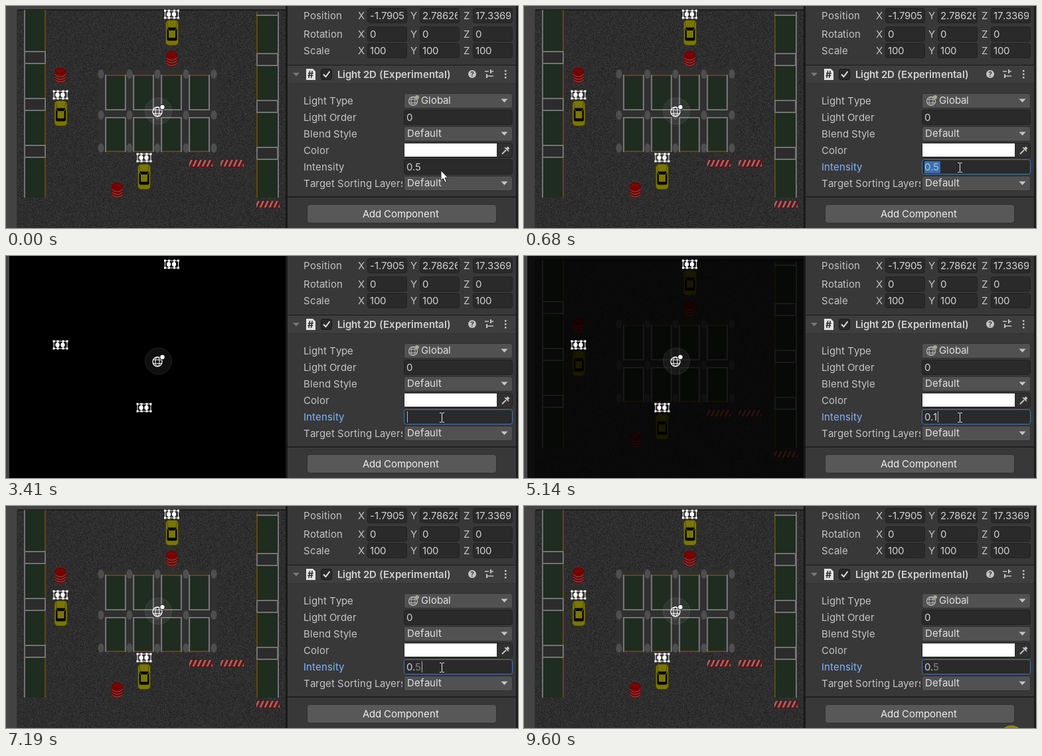
Recreate the animation shown at these times as an HTML page with a canvas. Size 771x336 px, loop 9930 ms.

```html
<!DOCTYPE html>
<html lang="en">
<head>
<meta charset="utf-8">
<title>Light intensity</title>
<style>
html, body { margin: 0; width: 100%; height: 100%; overflow: hidden; background: #383838; }
canvas { display: block; }
</style>
</head>
<body>
<canvas id="stage" width="771" height="336"></canvas>
<script>
const W = 771, H = 336, LOOP = 9930;
const ctx = document.getElementById('stage').getContext('2d');
const FONT = 'Inter, "Open Sans", sans-serif';

// Each step starts at `at` and overrides the state before it.
const STEPS = [
  { at: 0, light: 0.5, text: '0.5', pointer: [655, 249] },
  { at: 330, pointer: null, beam: true, border: '#656565' },
  { at: 680, focus: true, selected: true, border: '#3a79bb' },
  { at: 2040, light: 1, text: '1', selected: false, caret: true },
  { at: 3410, light: 0, text: '' },
  { at: 4440, text: '0' },
  { at: 4790, text: '0.' },
  { at: 5140, light: 0.1, text: '0.1' },
  { at: 6160, light: 0, text: '0.' },
  { at: 7190, light: 0.5, text: '0.', pending: '5' },
  { at: 8570, beam: false, pointer: [694, 316] },
  { at: 8920, pointer: null },
  { at: 9600, caret: false, ripple: true }
];
const stateAt = t => Object.assign({}, ...STEPS.filter(s => s.at <= t));

function rect(c, x, y, w, h, color) {
  c.fillStyle = color;
  c.fillRect(x, y, w, h);
}

function ellipse(c, x, y, rx, ry, fill, stroke, width = 1) {
  c.beginPath();
  c.ellipse(x, y, rx, ry, 0, 0, Math.PI * 2);
  if (fill) { c.fillStyle = fill; c.fill(); }
  if (stroke) { c.strokeStyle = stroke; c.lineWidth = width; c.stroke(); }
}

function roundBox(c, x, y, w, h, r, fill, stroke) {
  c.beginPath();
  c.roundRect(x + 0.5, y + 0.5, w - 1, h - 1, r);
  c.fillStyle = fill;
  c.fill();
  if (stroke) { c.strokeStyle = stroke; c.lineWidth = 1; c.stroke(); }
}

function shape(c, points, fill, stroke) {
  c.beginPath();
  points.forEach(([x, y]) => c.lineTo(x, y));
  c.closePath();
  if (fill) { c.fillStyle = fill; c.fill(); }
  if (stroke) { c.strokeStyle = stroke; c.lineWidth = 1; c.stroke(); }
}

function line(c, color, width, ...points) {
  c.beginPath();
  points.forEach(([x, y], i) => i ? c.lineTo(x, y) : c.moveTo(x, y));
  c.strokeStyle = color;
  c.lineWidth = width;
  c.stroke();
}

// Glyphs advance by whole pixels without kerning; returns the end of the text.
function label(c, text, x, y, color = '#c4c4c4', weight = 400, size = 15) {
  c.font = `${weight} ${size}px ${FONT}`;
  c.fillStyle = color;
  for (const glyph of text) {
    c.fillText(glyph, x, y + 5);
    x += Math.round(c.measureText(glyph).width);
  }
  return x;
}

function clipped(c, x, y, w, h, draw) {
  c.save();
  c.beginPath();
  c.rect(x, y, w, h);
  c.clip();
  draw();
  c.restore();
}

function layer(draw) {
  const canvas = document.createElement('canvas');
  canvas.width = W;
  canvas.height = H;
  draw(canvas.getContext('2d'));
  return canvas;
}

// Scene at full brightness

function asphalt(c) {
  let seed = 7;
  const random = () => (seed = (seed * 16807) % 2147483647) / 2147483647;
  const image = c.createImageData(416, H);
  for (let i = 0; i < image.data.length; i += 4) {
    image.data.fill(92 + (random() + random() - 1) * 36, i, i + 3);
    image.data[i + 3] = 255;
  }
  c.putImageData(image, 5, 0);
}

const GREEN = '#3f5840', WHITE = '#e6e6e6', GOLD = '#b8921c', PAVING = '#616161';

function sideColumn(c, x, top, shift, yellowX, whiteX) {
  rect(c, x, top, 34, 290 - top, PAVING);
  rect(c, x + 2, top, 30, 290 - top, GREEN);
  rect(c, yellowX, top, 2, 290 - top, GOLD);
  rect(c, whiteX, top, 2, 290 - top, WHITE);
  [68, 139, 210].forEach(y => {
    rect(c, x, y + shift, 33, 20, '#585858');
    c.strokeStyle = WHITE;
    c.lineWidth = 2;
    c.strokeRect(x + 1, y + shift + 1, 31, 18);
  });
}

function bay(c, x, y, h, goldAtTop) {
  rect(c, x, y, 32, h, '#696969');
  rect(c, x + 3, y + 2, 26, h - 4, GREEN);
  rect(c, x, y, 2, h, WHITE);
  rect(c, x + 30, y, 2, h, WHITE);
  rect(c, x + 2, y, 28, 2, goldAtTop ? GOLD : WHITE);
  rect(c, x + 2, y + h - 2, 28, 2, goldAtTop ? WHITE : GOLD);
}

function island(c) {
  rect(c, 139, 97, 179, 125, PAVING);
  [149, 191, 233, 275].forEach(x => {
    bay(c, x, 104, 54, true);
    bay(c, x, 168, 53, false);
  });
  [143, 186, 228, 271, 313].forEach(x =>
    [103, 165, 215].forEach(y => ellipse(c, x, y, 4.5, 7, '#9c9c9c')));
}

function car(c, x, y) {
  roundBox(c, x - 10, y - 20, 20, 39, 5, '#f3ec00', '#8a8500');
  line(c, '#aaa400', 1, [x - 7, y - 17], [x - 6, y - 8]);
  line(c, '#aaa400', 1, [x + 7, y - 17], [x + 6, y - 8]);
  roundBox(c, x - 8, y - 9, 16, 21, 2, '#080800');
  rect(c, x - 5, y - 4, 10, 11, '#f3ec00');
  line(c, '#f3ec00', 1, [x - 8, y - 9], [x - 5, y - 4]);
  line(c, '#f3ec00', 1, [x + 8, y - 9], [x + 5, y - 4]);
}

function barrel(c, x, y) {
  [6, 2, -2, -6].forEach(dy => {
    ellipse(c, x, y + dy, 8.5, 5.5, '#f00000');
    if (dy > -6) {
      c.beginPath();
      c.ellipse(x, y + dy - 1, 8, 5, 0, 0.25, Math.PI - 0.25);
      c.strokeStyle = '#f4c4c4';
      c.lineWidth = 1;
      c.stroke();
    }
  });
  ellipse(c, x, y - 7, 7.5, 4, '#fa0808', '#cc0000');
}

function barrier(c, x, y) {
  clipped(c, x, y, 35, 11, () => {
    rect(c, x, y, 35, 11, '#eeeeee');
    for (let i = -1; i < 6; i++) {
      const left = x + i * 7;
      shape(c, [[left, y + 11], [left + 4, y + 11], [left + 9, y], [left + 5, y]], '#e81010');
    }
    rect(c, x, y + 10, 35, 1, '#b52020');
  });
}

const scene = layer(c => {
  asphalt(c);
  rect(c, 5, 0, 12, H, '#858585');
  rect(c, 5, 0, 416, 5, '#888888');
  rect(c, 17, 5, 404, 2, '#383838');
  rect(c, 16, 7, 1, H - 7, '#636363');
  sideColumn(c, 27, 6, 0, 58, 27);
  sideColumn(c, 377, 9, 3, 377, 409);
  rect(c, 379, 9, 30, 4, PAVING);
  rect(c, 377, 13, 33, 2, WHITE);
  island(c);
  car(c, 250, 41);
  car(c, 82.5, 163);
  car(c, 208, 259);
  barrel(c, 249.5, 80);
  barrel(c, 82, 105);
  barrel(c, 167.5, 279);
  barrier(c, 276, 233);
  barrier(c, 323, 233);
  barrier(c, 377, 295);
});

// Editor overlays that ignore the light

function globe(c, x, y, r, color) {
  ellipse(c, x, y, r, r, null, color, 1.3);
  ellipse(c, x, y, r * 0.45, r, null, color);
  line(c, color, 1, [x - r * 0.9, y - r * 0.4], [x + r * 0.9, y - r * 0.4]);
  line(c, color, 1, [x - r * 0.9, y + r * 0.4], [x + r * 0.9, y + r * 0.4]);
}

function headlights(c, x, y) {
  c.strokeStyle = '#ffffff';
  c.lineWidth = 1;
  c.strokeRect(x - 9.5, y - 5.5, 20, 11);
  line(c, '#ffffff', 1, [x - 3.5, y - 6], [x - 3.5, y + 6]);
  line(c, '#ffffff', 1, [x + 4.5, y - 6], [x + 4.5, y + 6]);
  [-4, 4].forEach(dx => ellipse(c, x + dx, y, 3.2, 3.5, '#ffffff'));
  [-11, -5, 3, 9].forEach(dx =>
    [-7, 4].forEach(dy => rect(c, x + dx, y + dy, 3, 3, '#ffffff')));
}

const gizmos = layer(c => {
  ellipse(c, 229.5, 159, 20, 20, 'rgba(255,255,255,.06)', 'rgba(255,255,255,.1)');
  globe(c, 228, 160, 7, '#ffffff');
  ellipse(c, 235.5, 153, 4.2, 4.2, '#191919');
  ellipse(c, 235.5, 153, 3.2, 3.2, '#ffffff');
  headlights(c, 249, 12.5);
  headlights(c, 81.5, 134.5);
  headlights(c, 207.5, 229.5);
});

// Inspector

const field = (c, x, y, w, border = '#212121') => roundBox(c, x, y, w, 23, 3, '#2a2a2a', border);

function arrowDown(c, x, y, color) {
  shape(c, [[x - 5, y - 2.5], [x + 5, y - 2.5], [x, y + 3]], color);
}

function dropdown(c, y, text, textX = 604) {
  roundBox(c, 599, y - 11, 164, 23, 3, '#515151', '#303030');
  label(c, text, textX, y, '#e0e0e0');
  arrowDown(c, 750.5, y, '#c4c4c4');
}

function vectorRow(c, name, y, values) {
  label(c, name, 448, y);
  values.forEach((value, i) => {
    const x = 544 + i * 79.5 | 0;
    label(c, 'XYZ'[i], x - 14, y);
    field(c, x, y - 12, 60);
    clipped(c, x, y - 10, 57, 21, () => label(c, value, x + 4, y, '#d2d2d2'));
  });
}

function header(c) {
  rect(c, 424, 89, 344, 1, '#1a1a1a');
  rect(c, 424, 90, 344, 27, '#3e3e3e');
  rect(c, 424, 117, 344, 1, '#303030');
  arrowDown(c, 437, 103.5, '#777777');
  shape(c, [[452, 95], [462, 95], [466, 99], [466, 112], [452, 112]], '#e4e4e4');
  label(c, '#', 454, 104, '#303030', 700, 14);
  roundBox(c, 474, 95, 17, 17, 3, '#2a2a2a', '#171717');
  line(c, '#e4e4e4', 2, [478, 103.5], [481.5, 107], [487.5, 99]);
  label(c, 'Light 2D (Experimental)', 499, 104, '#d2d2d2', 600);
  ellipse(c, 702, 103, 6, 6, '#c4c4c4');
  label(c, '?', 699.2, 102.2, '#3e3e3e', 700, 10);
  [[99, 730], [106, 724]].forEach(([y, x]) => {
    line(c, '#c4c4c4', 1.5, [721, y], [734, y]);
    line(c, '#3e3e3e', 2, [x - 2, y - 3], [x - 2, y + 3]);
    line(c, '#c4c4c4', 2, [x, y - 3], [x, y + 3]);
  });
  [98, 103, 108].forEach(y => rect(c, 751, y - 1, 2.5, 2.5, '#c4c4c4'));
}

function colorPicker(c) {
  roundBox(c, 599, 207, 164, 23, 3, '#303030', '#212121');
  rect(c, 600, 208, 139, 20, '#ffffff');
  line(c, '#c4c4c4', 2, [747, 224], [753, 218]);
  line(c, '#c4c4c4', 4, [754, 217], [757, 214]);
  line(c, '#c4c4c4', 1.5, [751, 214], [757, 220]);
}

const inspector = layer(c => {
  rect(c, 0, 0, 5, H, '#454545');
  rect(c, 421, 0, 3, H, '#191919');
  rect(c, 424, 0, 344, H, '#383838');
  rect(c, 768, 0, 3, H, '#1c1c1c');
  vectorRow(c, 'Position', 15, ['-1.790554', '2.786264', '17.33694']);
  vectorRow(c, 'Rotation', 43, ['0', '0', '0']);
  vectorRow(c, 'Scale', 68, ['100', '100', '100']);
  header(c);
  ['Light Type', 'Light Order', 'Blend Style', 'Color'].forEach((name, i) =>
    label(c, name, 448, 144 + i * 25));
  clipped(c, 448, 255, 149, 28, () => label(c, 'Target Sorting Layers', 448, 269));
  dropdown(c, 143, 'Global', 625);
  globe(c, 613, 144, 6.5, '#b8b8b8');
  ellipse(c, 619, 138, 3, 3, '#a8a890');
  field(c, 599, 157, 164);
  label(c, '0', 603, 169, '#d2d2d2');
  dropdown(c, 193, 'Default');
  colorPicker(c);
  dropdown(c, 268, 'Default');
  rect(c, 424, 288, 344, 2, '#1f1f1f');
  roundBox(c, 453, 300, 286, 29, 4, '#585858', '#303030');
  label(c, 'Add Component', 537, 315, '#eeeeee');
});

function pointer(c, x, y) {
  const outline = [[0, 0], [0, 15], [3.5, 12], [6, 18], [8.5, 17], [6, 11], [10.5, 11]];
  shape(c, outline.map(([dx, dy]) => [x + dx, y + dy]), '#ffffff', '#202020');
}

function beam(c) {
  line(c, '#e8e8e8', 1, [656.5, 238], [656.5, 251]);
  [237.5, 251.5].forEach(y => {
    line(c, '#e8e8e8', 1, [653, y], [656, y]);
    line(c, '#e8e8e8', 1, [657, y], [660, y]);
  });
}

function intensity(c, s) {
  label(c, 'Intensity', 448, 244, s.focus ? '#81b4ff' : '#c4c4c4');
  field(c, 599, 232, 164, s.border);
  if (s.selected) rect(c, 603, 235, 24, 18, '#3b70ad');
  let end = label(c, s.text, 603, 244, s.selected ? '#a9c3e2' : '#d2d2d2');
  if (s.pending) end = label(c, s.pending, end, 244, '#858585');
  if (s.caret) rect(c, end + 1, 235, 1, 17, '#b4b4b4');
}

function draw(t) {
  const s = stateAt(t);
  rect(ctx, 0, 0, W, H, '#000000');
  ctx.globalAlpha = s.light;
  ctx.drawImage(scene, 0, 0);
  ctx.globalAlpha = 1;
  ctx.drawImage(gizmos, 0, 0);
  ctx.drawImage(inspector, 0, 0);
  intensity(ctx, s);
  if (s.beam) beam(ctx);
  if (s.pointer) pointer(ctx, ...s.pointer);
  if (s.ripple) ellipse(ctx, 734, 350, 18, 18, '#8b8410');
}

const start = performance.now();
function tick() {
  draw((performance.now() - start) % LOOP);
  requestAnimationFrame(tick);
}
tick();
</script>
</body>
</html>
```
